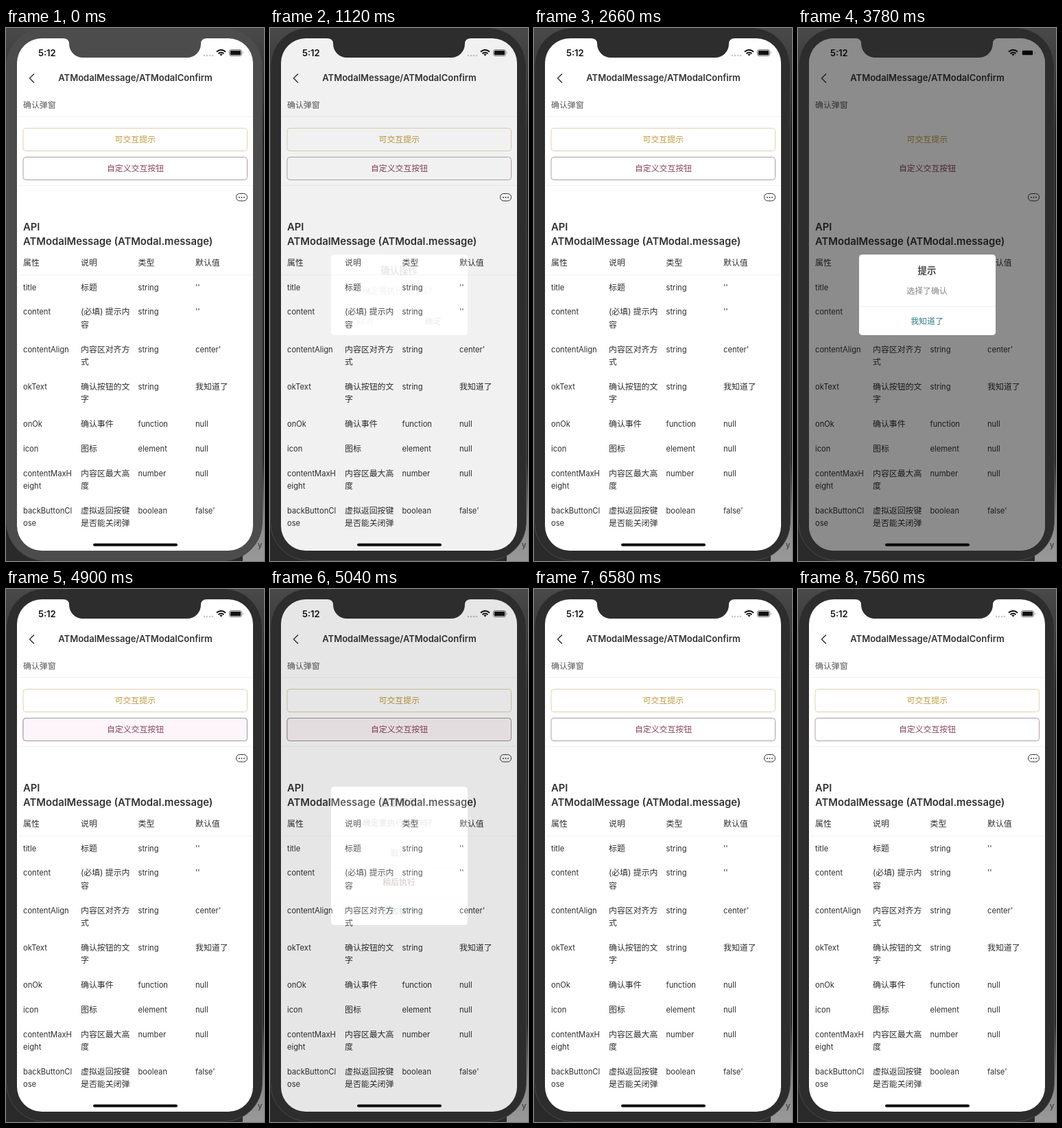
An HTML page for the animation above (7.7 s loop, 376x774 px).

```html
<!DOCTYPE html>
<html lang="zh-CN">
<head>
<meta charset="utf-8">
<title>ATModal</title>
<style>
html, body { margin: 0; width: 100%; height: 100%; overflow: hidden; background: #222; }
svg { display: block; width: 376px; height: 774px; }
text { font-family: Inter, "Noto Sans CJK SC", "Noto Sans CJK", sans-serif; font-size: 11.9px; fill: #2f2f2f; white-space: pre; }
.latin { font-size: 11.2px; }
.mid { text-anchor: middle; }
.head { font-size: 13px; font-weight: 600; fill: #333; }
.h2 { font-size: 14.8px; font-weight: 600; fill: #333; }
.name { font-size: 13.4px; font-weight: 600; fill: #4c4c4c; }
.body { fill: #868686; }
.cancel { fill: #9c9c9c; }
.ok { fill: #2f7c84; font-weight: 500; }
.later { fill: #7c3a48; font-weight: 600; }
.rule { stroke: #f2f2f2; }
.outline { fill: none; stroke: #333; }
.mask { fill-opacity: .45; }
.bezel, .fine, .press, .modal { animation: 7.7s linear infinite; }
.bezel { fill: #2d2d2d; animation-name: focus; }
.fine { animation-name: fine; }
.press { opacity: 0; animation-name: press; }
.modal { opacity: 0; }
#confirm { animation-name: confirm; }
#notice { animation-name: notice; }
#choice { animation-name: choice; }
@keyframes focus {
  0%, 12.72% { fill: #4c4c4c; }
  12.73%, 100% { fill: #2d2d2d; }
}
@keyframes press {
  0%, 62.72% { opacity: 0; }
  62.73%, 66.3% { opacity: 1; }
  66.31%, 100% { opacity: 0; }
}
@keyframes fine {
  0%, 14.03%, 34.03%, 35.06%, 50.91%, 100% { opacity: 1; }
  18.18%, 31.82%, 39.1%, 49.16% { opacity: 0; }
}
@keyframes confirm {
  0%, 14.03%, 34.03%, 100% { opacity: 0; }
  18.18%, 31.82% { opacity: 1; }
}
@keyframes notice {
  0%, 35.06%, 50.91%, 100% { opacity: 0; }
  39.1%, 49.16% { opacity: 1; }
}
@keyframes choice {
  0%, 64.68%, 85.32%, 100% { opacity: 0; }
  68.31%, 82.99% { opacity: 1; }
}
</style>
</head>
<body>
<svg viewBox="0 0 376 774">
  <defs>
    <path id="screen" d="M52 15H83Q92 15 92 23A20 20 0 0 0 112 43H264A20 20 0 0 0 284 23Q284 15 293 15H324A36 36 0 0 1 360 51V723A36 36 0 0 1 324 759H52A36 36 0 0 1 16 723V51A36 36 0 0 1 52 15Z"/>
    <linearGradient id="desk" x2="0" y2="1">
      <stop offset="0" stop-color="#4a4a4a"/>
      <stop offset=".2" stop-color="#222"/>
      <stop offset="1" stop-color="#2a2a2a"/>
    </linearGradient>
    <linearGradient id="paper" x2="0" y2="1">
      <stop offset="0" stop-color="#2a2a2a"/>
      <stop offset=".6" stop-color="#8a8a8a"/>
      <stop offset="1" stop-color="#999"/>
    </linearGradient>
  </defs>

  <rect width="376" height="774" fill="url(#desk)"/>
  <path d="M345 630H376V774H345Z" fill="url(#paper)"/>
  <text x="367" y="755" class="latin">y</text>
  <rect class="bezel" x=".5" y="-.5" width="373" height="774" rx="56" stroke="#484848"/>
  <use href="#screen" fill="#fff"/>

  <text class="head" x="47" y="41" style="fill:#111">5:12</text>
  <path class="fine" d="M289 40H302" stroke="#c6c6c6" stroke-width="2.6" stroke-linecap="round" stroke-dasharray="0 4"/>
  <g fill="none" stroke="#111" stroke-width="2">
    <path d="M307 34.6Q313.5 28.8 320 34.6M309.5 37.2Q313.5 33.8 317.5 37.2"/>
    <path d="M311.3 38.3Q313.5 36.6 315.7 38.3L313.5 40.6Z" fill="#111" stroke="none"/>
  </g>
  <rect class="fine" x="325.5" y="31.5" width="18" height="9" rx="2.5" fill="none" stroke="#777"/>
  <rect x="326.8" y="32.8" width="15.4" height="6.4" rx="1.3" fill="#111"/>
  <path d="M345 34.5Q346.5 36 345 37.5Z" fill="#777"/>

  <path class="outline" d="M41 66.5L34.5 73L41 79.5" stroke-width="1.4"/>
  <text class="head mid" x="188.5" y="77">ATModalMessage/ATModalConfirm</text>
  <text x="25" y="116.3" style="fill:#555">确认弹窗</text>

  <g class="fine">
    <path class="rule" d="M17 128.5H360M17 228.5H360M17 358.5H360"/>
    <rect x="25" y="145.5" width="326.5" height="33" rx="4" fill="none" stroke="#e0d2b0"/>
    <rect x="25" y="187.5" width="326.5" height="33" rx="4" fill="none" stroke="#ad9ca4"/>
  </g>
  <rect class="press" x="25" y="187.5" width="326.5" height="33" rx="4" fill="#fdf5f9" stroke="#a09a9d"/>
  <text class="mid" x="188.3" y="166.3" style="fill:#c19a3f">可交互提示</text>
  <text class="mid" x="188.5" y="208" style="fill:#894558">自定义交互按钮</text>

  <rect class="outline" x="335.5" y="240.5" width="16" height="10.5" rx="5"/>
  <path d="M340 246H348" stroke="#333" stroke-width="1.8" stroke-linecap="round" stroke-dasharray="0 3.5"/>

  <text class="h2" x="25" y="293.5">API</text>
  <text class="h2" x="25" y="315.3">ATModalMessage (ATModal.message)</text>
  <g id="table"></g>
  <rect x="127" y="748.5" width="123" height="4" rx="2" fill="#0a0a0a"/>

  <g class="modal" id="confirm">
    <use class="mask" href="#screen"/>
    <rect x="89" y="329" width="199" height="117" rx="4.5" fill="#fff"/>
    <path class="rule" d="M89 404.5H288"/>
    <g class="mid">
      <text class="name" x="188" y="357">确认操作</text>
      <text class="body" x="185.5" y="386.2">确定要执行操作吗?</text>
      <text class="cancel" x="138" y="430">取消</text>
      <text class="ok" x="237.5" y="430">确定</text>
    </g>
  </g>

  <g class="modal" id="notice">
    <use class="mask" href="#screen"/>
    <rect x="89" y="329" width="199" height="117" rx="4.5" fill="#fff"/>
    <path class="rule" d="M89 404.5H288"/>
    <g class="mid">
      <text class="name" x="188" y="357">提示</text>
      <text class="body" x="188" y="386.2">选择了确认</text>
      <text class="ok" x="188" y="430">我知道了</text>
    </g>
  </g>

  <g class="modal" id="choice">
    <use class="mask" href="#screen"/>
    <rect x="89" y="287" width="199" height="201" rx="4.5" fill="#fff"/>
    <path class="rule" d="M89 362.5H288M89 404.5H288M89 446.5H288"/>
    <g class="mid">
      <text class="name" x="188" y="315">重要提示</text>
      <text class="body" x="185.5" y="344.2">确定要执行操作吗?</text>
      <text class="cancel" x="188" y="388">取消</text>
      <text class="later" x="188" y="430">稍后执行</text>
      <text class="ok" x="188" y="472">立即执行</text>
    </g>
  </g>
</svg>
<script>
const columns = [25, 109, 192.5, 276];
// Baseline of the first line, then the cells; "|" breaks a line.
const rows = [
  [345.3, '属性', '说明', '类型', '默认值'],
  [381, 'title', '标题', 'string', "''"],
  [416.3, 'content', '(必填) 提示内|容', 'string', "''"],
  [470.5, 'contentAlign', '内容区对齐方|式', 'string', "center'"],
  [525, 'okText', '确认按钮的文|字', 'string', '我知道了'],
  [579.3, 'onOk', '确认事件', 'function', 'null'],
  [615, 'icon', '图标', 'element', 'null'],
  [650.8, 'contentMaxH|eight', '内容区最大高|度', 'number', 'null'],
  [705, 'backButtonCl|ose', '虚拟返回按键|是否能关闭弹', 'boolean', "false'"]
];
const table = document.getElementById('table');

function addText(x, y, content) {
  const text = document.createElementNS('http://www.w3.org/2000/svg', 'text');
  text.setAttribute('x', x);
  text.setAttribute('y', y);
  if (/^[\x00-\x7f]+$/.test(content)) text.setAttribute('class', 'latin');
  text.textContent = content;
  table.append(text);
}

for (const [y, ...cells] of rows)
  cells.forEach((cell, column) =>
    cell.split('|').forEach((line, i) => addText(columns[column], y + i * 18.4, line)));
</script>
</body>
</html>
```
